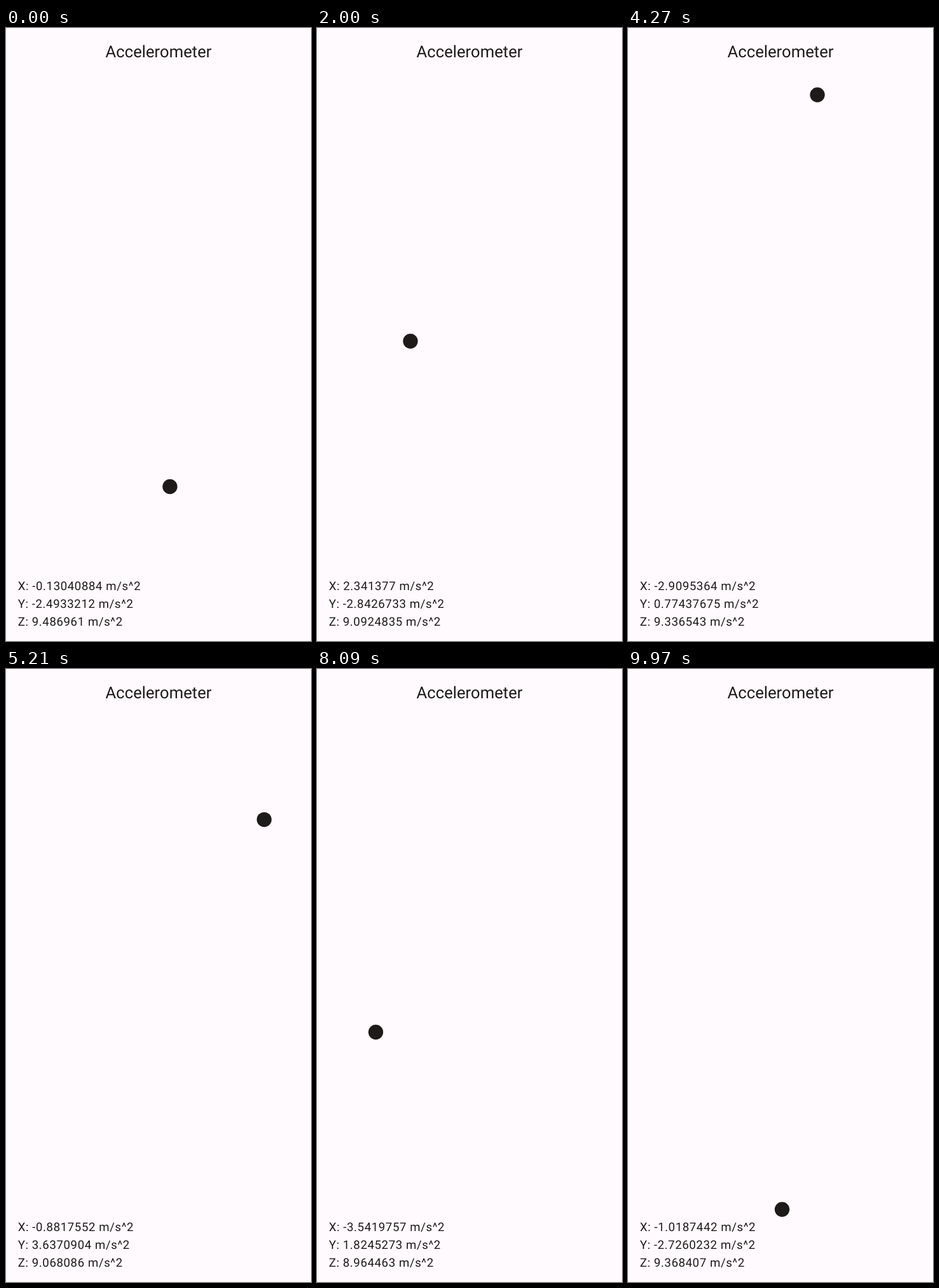
Recreate the animation shown at these times as an HTML page with a canvas. Size 480 by 963 pixels, loop 10 s.

```html
<!DOCTYPE html>
<html lang="en">
<head>
<meta charset="utf-8">
<title>Accelerometer</title>
<style>
  html, body { margin: 0; width: 100%; height: 100%; overflow: hidden; background: #fffafe; }
  canvas { display: block; width: 480px; height: 963px; }
</style>
</head>
<body>
<canvas id="stage" width="480" height="963"></canvas>
<script>
const ctx = document.getElementById('stage').getContext('2d');
const LOOP = 10000, FPS = 33;
const DP = 480 / 411.43;
const SPEED = 55; // ball speed in px/s for each m/s^2
const GRAVITY = 9.81;
const INK = '#1d1b1a', PAPER = '#fffafe';

// Key poses: the ball's place and the tilt that drives it.
const poses = [
  { t: 0, x: 258, y: 720.5, ax: -0.13040884, ay: -2.4933212 },
  { t: 2000, x: 147, y: 492, ax: 2.341377, ay: -2.8426733 },
  { t: 3330, x: 146.5, y: 227, ax: -2.5555346, ay: -3.6903307 },
  { t: 5210, x: 406.3, y: 236.6, ax: -0.8817552, ay: 3.6370904 },
  { t: 6940, x: 235.6, y: 455, ax: 6.0113688, ay: 2.1589243 },
  { t: 8090, x: 92.5, y: 570.5, ax: -3.5419757, ay: 1.8245273 },
  { t: 9970, x: 242.5, y: 849, ax: -1.0187442, ay: -2.7260232 }
];

// Between poses the ball turns back at a few points, where its tilt is zero.
const turn = (t, pos) => ({ t, pos, acc: 0 });
const makePath = (axis, turns) => poses
  .map(p => ({ t: p.t, pos: p[axis], acc: p['a' + axis] }))
  .concat(turns)
  .sort((a, b) => a.t - b.t);

const pathX = makePath('x', [turn(550, 269), turn(2650, 104), turn(5850, 465), turn(7600, 43)]);
const pathY = makePath('y', [turn(4130, 102), turn(9620, 873)]);

// Cubic Hermite position and its slope; sign maps tilt to screen direction.
function follow(path, t, sign) {
  const next = Math.max(1, path.findIndex(p => p.t >= t));
  const a = path[next - 1], b = path[next];
  const u = (t - a.t) / (b.t - a.t);
  const scale = sign * SPEED * (b.t - a.t) / 1000;
  const m = a.acc * scale, n = b.acc * scale, d = b.pos - a.pos;
  const c2 = 3 * d - 2 * m - n, c3 = m + n - 2 * d;
  return {
    pos: a.pos + u * (m + u * (c2 + u * c3)),
    acc: (m + u * (2 * c2 + 3 * u * c3)) / scale
  };
}

// Shortest decimal that identifies a single-precision float.
function floatText(value) {
  const single = Math.fround(value);
  if (Math.abs(single) < 1e-6) return '0.0';
  let digits = 6;
  while (digits < 9 && Math.fround(single.toPrecision(digits)) !== single) digits++;
  return single.toPrecision(digits);
}

function label(text, x, y, size, spacing, align) {
  ctx.font = `400 ${size * DP}px Roboto, sans-serif`;
  ctx.letterSpacing = `${spacing * DP}px`;
  ctx.textRendering = 'geometricPrecision';
  ctx.textAlign = align;
  ctx.fillText(text, x, y);
}

function draw(t) {
  const x = follow(pathX, t, -1), y = follow(pathY, t, 1);
  const z = Math.sqrt(Math.max(0, GRAVITY ** 2 - x.acc ** 2 - y.acc ** 2));

  ctx.fillStyle = PAPER;
  ctx.fillRect(0, 0, 480, 963);
  ctx.fillStyle = INK;
  label('Accelerometer', 240, 46.3, 22, 0, 'center');
  Object.entries({ X: x.acc, Y: y.acc, Z: z }).forEach(([axis, value], i) =>
    label(`${axis}: ${floatText(value)} m/s^2`, 16 * DP, 883.2 + i * 24 * DP, 16, 0.5, 'left'));

  ctx.beginPath();
  ctx.arc(x.pos, y.pos, 10 * DP, 0, Math.PI * 2);
  ctx.fill();
}

// Each picture is held for one frame; frame times are rounded to 10 ms.
function tick() {
  const t = performance.now() % LOOP;
  const frame = Math.min(Math.floor((t + 5) * FPS / 1000), LOOP * FPS / 1000 - 1);
  draw(Math.round(frame * 100 / FPS) * 10);
  requestAnimationFrame(tick);
}
tick();
</script>
</body>
</html>
```
